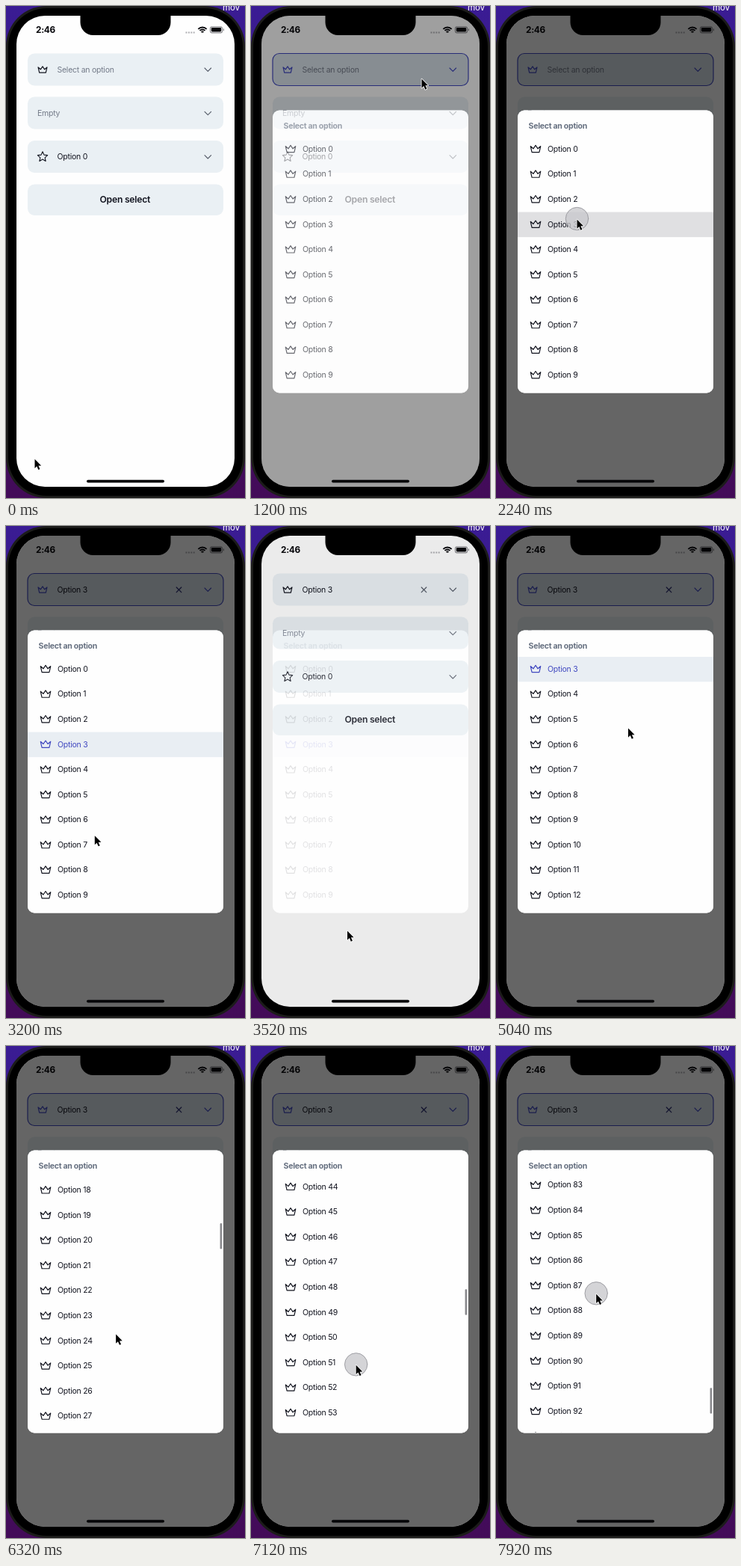
An HTML page with a canvas that plays this animation: 320x658 px, repeating every 8 s.

```html
<!DOCTYPE html>
<html lang="en">
<head>
<meta charset="utf-8">
<title>Select picker</title>
<style>
html, body { margin: 0; width: 100%; height: 100%; overflow: hidden; background: #000; }
canvas { display: block; width: 320px; height: 658px; }
</style>
</head>
<body>
<canvas id="stage"></canvas>
<script>
const W = 320, H = 658, LOOP = 8000;
const canvas = document.getElementById('stage');
const ctx = canvas.getContext('2d');
const dpr = window.devicePixelRatio || 1;
canvas.width = W * dpr;
canvas.height = H * dpr;

const INK = '#12141f', MUTED = '#737a88', ICON = '#555b68', INDIGO = '#4048c0';
const FIELD = '#eaf0f4', FIELD_FOCUS = '#d8e1e9';
const ROW = 33.58, LIST_TOP = 175, LIST_END = 517, OPTIONS = 100, PICKED = 3;

// Moments of the story, in ms
const FADE = 320;
const OPEN = 1000, PICK = 2800, CLOSE = 3240, REOPEN = 4720, SCROLL = 5104;
const FLICK = 662;

// Pointer moves: start, end, x, y
const moves = [
  [40, 560, 228.5, 97.5],
  [1400, 2100, 108.5, 285.5],
  [2900, 3500, 129, 541.5],
  [3920, 4480, 190, 92],
  [4760, 5030, 177, 270.5]
];

const clamp = v => Math.max(0, Math.min(1, v));
const ramp = (t, a, b) => clamp((t - a) / (b - a));
const smooth = p => p * p * (3 - 2 * p);
const mix = (a, b, p) => a + (b - a) * p;
const fade = (t, start) => ramp(t, start, start + FADE);
const between = (t, a, b) => t >= a && t < b;

function pointerAt(t) {
  let x = 38.5, y = 606;
  for (const [start, end, toX, toY] of moves) {
    const p = smooth(ramp(t, start, end));
    x = mix(x, toX, p);
    y = mix(y, toY, p);
  }
  // Repeated upward flicks drive the list.
  const u = t - SCROLL, p = smooth(ramp(t, 5040, 5360));
  return [
    mix(x, 157 - u * 0.0081, p),
    mix(y, 335 + 96 * Math.cos(u / FLICK * 2 * Math.PI), p)
  ];
}

function isPressed(t) {
  if (t >= SCROLL) return (t - SCROLL) % FLICK < FLICK / 2;
  return between(t, 720, 920) || between(t, 2180, PICK) || between(t, 4640, REOPEN);
}

// The flicks add up to a steadily accelerating scroll.
function scrollAt(t) {
  const u = Math.max(0, t - SCROLL);
  return t < REOPEN ? 0 : PICKED * ROW + 3.392e-4 * u * u;
}

function box(x, y, w, h, r, fill, stroke) {
  ctx.beginPath();
  ctx.roundRect(x, y, w, h, r);
  if (fill) { ctx.fillStyle = fill; ctx.fill(); }
  if (stroke) { ctx.strokeStyle = stroke; ctx.lineWidth = 1.2; ctx.stroke(); }
}

function label(s, x, y, color, size = 10.5, weight = 400, align = 'left') {
  ctx.font = `${weight} ${size}px Inter, Roboto, sans-serif`;
  ctx.letterSpacing = '-0.25px';
  ctx.textAlign = align;
  ctx.textBaseline = 'alphabetic';
  ctx.fillStyle = color;
  ctx.fillText(s, x, y + 3.8);
}

function line(points, color, width = 1.2, closed = false) {
  ctx.beginPath();
  points.forEach(([x, y]) => ctx.lineTo(x, y));
  if (closed) ctx.closePath();
  ctx.strokeStyle = color;
  ctx.lineWidth = width;
  ctx.lineJoin = ctx.lineCap = 'round';
  ctx.stroke();
}

function crown(x, y, color, s = 1) {
  const half = [[0, -4.6], [3, -0.2], [6.6, -3.4], [4.8, 4.6]];
  const shape = [...half, ...half.slice(1).reverse().map(([a, b]) => [-a, b])];
  line(shape.map(([a, b]) => [x + a * s, y + b * s]), color, 1.2, true);
}

function star(x, y, color) {
  const pts = Array.from({ length: 10 }, (_, i) => {
    const a = -Math.PI / 2 + i * Math.PI / 5, r = i % 2 ? 3.3 : 7;
    return [x + r * Math.cos(a), y + r * Math.sin(a)];
  });
  line(pts, color, 1.1, true);
}

const chevron = (y, color) => line([[266, y - 2], [270.3, y + 2.4], [274.6, y - 2]], color, 1.1);

function cross(x, y, color) {
  line([[x - 3.3, y - 3.3], [x + 3.3, y + 3.3]], color);
  line([[x + 3.3, y - 3.3], [x - 3.3, y + 3.3]], color);
}

function drawPhone() {
  const wall = ctx.createLinearGradient(0, 0, 0, H);
  wall.addColorStop(0, '#3a1c94');
  wall.addColorStop(1, '#430b58');
  ctx.fillStyle = wall;
  ctx.fillRect(0, 0, W, H);
  box(0, 0, W, H, 54, '#1c1c1a');
  box(3, 3, W - 6, H - 6, 51, '#000');
  label('mov', 290, 2.5, '#e8e4ee', 11.5, 500);
  box(14, 13, 292, 630, 38, '#fefefe');
}

function drawStatus() {
  const ink = '#08080c', grey = '#8c8c90';
  label('2:46', 40, 32.3, ink, 11.8, 700);
  ctx.fillStyle = '#b0b0b4';
  for (let i = 0; i < 4; i++) ctx.fillRect(240.5 + i * 3.4, 34.5, 2, 2);
  ctx.strokeStyle = ink;
  ctx.lineCap = 'butt';
  ctx.lineWidth = 1.8;
  for (const r of [2, 5, 8]) {
    ctx.beginPath();
    ctx.arc(263, 36.5, r, -Math.PI * 0.75, -Math.PI * 0.25);
    ctx.stroke();
  }
  box(273.5, 27.8, 16, 8, 2.4, null, grey);
  box(274.8, 29.1, 13.4, 5.4, 1.4, ink);
  ctx.fillStyle = grey;
  ctx.fillRect(290.8, 30.4, 1.2, 2.8);
}

function drawForm(t) {
  const focused = between(t, 920, CLOSE) || t >= REOPEN;
  const chosen = t >= PICK;
  box(29, 63.5, 262, 43, 9, focused ? FIELD_FOCUS : FIELD, focused && INDIGO);
  crown(49, 85, focused ? INDIGO : INK, 0.9);
  label(chosen ? 'Option 3' : 'Select an option', 68.5, 85, chosen ? INK : MUTED);
  if (chosen) cross(231.5, 85.3, focused ? '#282c70' : ICON);
  chevron(85, focused ? INDIGO : ICON);

  box(29, 121.5, 262, 43, 9, FIELD);
  label('Empty', 42, 143.3, MUTED);
  chevron(143.3, ICON);

  box(29, 180, 262, 43, 9, FIELD);
  star(49, 201.8, INK);
  label('Option 0', 68.5, 201.6, INK);
  chevron(201.6, ICON);

  box(29, 238.5, 262, 41.5, 9, FIELD);
  label('Open select', 159.3, 259, INK, 12.2, 600, 'center');
}

// The dimming leaves out the area under the sheet.
function drawBackdrop(a) {
  ctx.beginPath();
  ctx.roundRect(14, 13, 292, 630, 38);
  ctx.roundRect(29, 139.5, 262, 378, 9);
  ctx.fillStyle = `rgba(0, 0, 0, ${0.6 * a})`;
  ctx.fill('evenodd');
}

function drawSheet(t, a) {
  const scroll = scrollAt(t);
  ctx.save();
  ctx.globalAlpha = a;
  box(29, 139.5, 262, 378, 9, '#fefefe');
  label('Select an option', 43.5, 160.5, '#667080', 10.5, 700);

  ctx.beginPath();
  ctx.roundRect(29, LIST_TOP, 262, LIST_END - LIST_TOP, [0, 0, 9, 9]);
  ctx.clip();
  const first = Math.max(0, Math.floor(scroll / ROW) - 1);
  for (let n = first; n < Math.min(OPTIONS, first + 13); n++) {
    const y = 191 + n * ROW - scroll;
    const picked = n === PICKED && t >= PICK;
    const pressed = n === PICKED && between(t, 2180, PICK);
    if (picked || pressed) {
      ctx.fillStyle = picked ? '#e9eef3' : '#e0e0e2';
      ctx.fillRect(29, y - 16.2, 262, ROW);
    }
    const color = picked ? INDIGO : INK;
    crown(53, y, color, 1.02);
    label('Option ' + n, 69, y, color);
  }
  ctx.globalAlpha = a * ramp(t, SCROLL, SCROLL + 150);
  box(286.6, 176.5 + 0.1005 * scroll, 2.6, 34.5, 1.3, '#88888c');
  ctx.restore();
}

function drawHardware() {
  box(99.5, 8, 121, 31, [0, 0, 17, 17], '#000');
  box(108, 633.7, 104, 3.8, 1.9, '#060608');
}

function drawPointer(t) {
  const [x, y] = pointerAt(t);
  if (isPressed(t)) {
    ctx.beginPath();
    ctx.arc(x, y - 1, 15.2, 0, Math.PI * 2);
    ctx.fillStyle = 'rgba(200, 200, 204, 0.78)';
    ctx.fill();
    ctx.strokeStyle = '#97979c';
    ctx.lineWidth = 0.9;
    ctx.stroke();
  }
  const arrow = [[0, 0], [0, 12.2], [2.8, 9.6], [4.8, 14.2], [6.9, 13.3], [4.9, 8.8], [8.6, 8.7]];
  line(arrow.map(([a, b]) => [x + a, y + b]), '#fff', 1.6, true);
  ctx.fillStyle = '#000';
  ctx.fill();
}

function draw(t) {
  ctx.setTransform(dpr, 0, 0, dpr, 0, 0);
  drawPhone();
  drawStatus();
  drawForm(t);
  const shown = fade(t, OPEN) - fade(t, CLOSE) + fade(t, REOPEN);
  if (shown > 0) drawBackdrop(shown);
  drawHardware();
  if (shown > 0) drawSheet(t, shown);
  drawPointer(t);
}

const start = performance.now();
function tick() {
  draw((performance.now() - start) % LOOP);
  requestAnimationFrame(tick);
}
tick();
</script>
</body>
</html>
```
